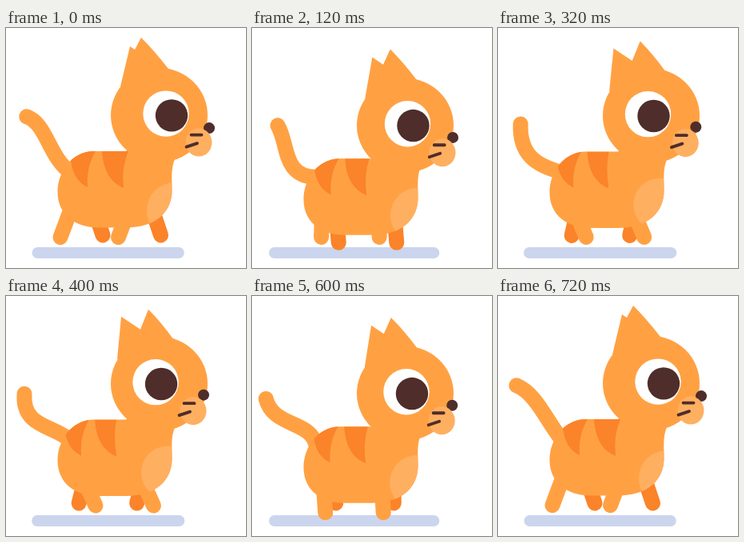
Write an HTML page with a canvas that moves like this. It is 300 px wide and 300 px high and loops after 0.76 s.

```html
<!DOCTYPE html>
<html lang="en">
<head>
<meta charset="utf-8">
<title>Walking cat</title>
<style>
html, body { margin: 0; width: 100%; height: 100%; overflow: hidden; background: #fff; }
canvas { display: block; width: 300px; height: 300px; }
</style>
</head>
<body>
<canvas id="stage" width="300" height="300"></canvas>
<script>
const ctx = document.getElementById('stage').getContext('2d');
const STEP = 40, STEPS = 19, MID = 9;
const FUR = '#ffa143', DARK = '#fb8329', LIGHT = '#ffaf60', BROWN = '#4f2d2a', SHADE = '#cbd5ee';

// Two dips per loop, mirrored about its middle.
const bobAt = s => 10.2 * Math.sin(Math.PI * (Math.abs(s - MID) / 9.2) ** 1.2) ** 2;
// 0 to 1 and back: turns the head and swings the legs.
const turnAt = s => Math.sin(Math.PI * (s / 18) ** 1.1);
// Slow wag of the tail, -1 to 1.
const swayAt = s => Math.cos(2 * Math.PI * (s - 4.5) / STEPS);

const mix = (a, b, k) => a + (b - a) * k;

function fill(color, path) {
  ctx.fillStyle = color;
  ctx.fill(path);
}

function oval(color, x, y, rx, ry = rx) {
  const p = new Path2D();
  p.ellipse(x, y, rx, ry, 0, 0, 2 * Math.PI);
  fill(color, p);
}

function line(color, width, d) {
  ctx.strokeStyle = color;
  ctx.lineWidth = width;
  ctx.stroke(new Path2D(d));
}

// A hind leg and the front leg that moves with it.
function legs(color, hip, bob, x, y) {
  for (const dx of [0, 72.5]) {
    line(color, 19, `M${hip + dx} ${208 + bob}L${x + dx} ${y}`);
  }
}

function drawTail(bob, k, sway) {
  const tip = `${25 + 8 * sway} ${111 + 10 * k + bob - 3 * sway}`;
  const bend = `${50 - 28 * k + 9 * sway} ${120 + 42 * k + 1.5 * bob - 8 * sway}`;
  const root = `${55 - 20 * sway} ${159 + 17 * sway + 6 * k + bob}`;
  line(FUR, 19, `M${tip}C${bend} ${root} 80 ${180 + .7 * bob}`);
}

const torso = new Path2D(`M108 154C82 155 64.5 180 64.5 205C64.5 233 86 249.5 116 249.5L150 249.5
  C187 249.5 207.5 230 207.5 203C207.5 188 206 176 211 164L190 140L160 140L150 154Z`);

function drawTorso(k) {
  fill(FUR, torso);
  ctx.save();
  ctx.clip(torso);
  const a = -8 * k, b = -9 * k, c = -15 * k;
  fill(DARK, new Path2D(`M${112 + a} 154Q${100 + a} 174 ${102 + a} 199
    Q${84 + a} 191 ${81 + a} 165L${81 + a} 150L${112 + a} 150Z`));
  fill(DARK, new Path2D(`M${120 + b} 154Q${122 + b} 190 ${147 + b} 200
    Q${mix(144, 134, k)} 174 ${153 + c} 154Z`));
  oval(LIGHT, 211 - 9 * k, 228 - 8 * k, 35 - 2 * k);
  ctx.restore();
}

function drawHead(k) {
  const at = (x0, y0, x1, y1) => `${mix(x0, x1, k)} ${mix(y0, y1, k)}`;
  oval(FUR, 191.5, 109, 60.5, 59);
  fill(FUR, new Path2D(`M${at(143, 73, 139, 78)}L${at(155, 23, 144, 25)}
    L${at(161, 27, 168, 41)}L${at(169, 12, 178, 16)}
    Q${at(186, 29, 194, 32)} ${at(203, 51, 209, 53)}L226 61L190 110Z`));

  // Face features slide together as the head turns.
  ctx.save();
  ctx.translate(-7 * k, 0);
  oval(BROWN, 254, 125 - 2 * k, 7);
  oval(LIGHT, 241, 143, 16.5, 17.5);
  ctx.translate(-2 * k, 0);
  line(BROWN, 3.8, 'M231.5 133.5L244.5 133.5M225.5 148.5L239 144');
  ctx.translate(-4 * k, 0);
  oval('#fff', 200, 107, 28.7);
  oval(BROWN, 207, 109.3, 20.2);
  ctx.restore();
}

function draw(s) {
  const bob = bobAt(s), k = turnAt(s), half = 88 + 1.25 * bob;
  ctx.clearRect(0, 0, 300, 300);
  ctx.lineCap = 'round';
  line(SHADE, 14, `M${127.7 - half} 281L${127.7 + half} 281`);

  // The legs that carry the weight sink with the body.
  legs(DARK, 104, bob, 121 - 30 * k, 259 + (s < MID ? bob : 0));
  drawTail(bob, k, swayAt(s));
  legs(FUR, 88, bob, 68 + 44 * k, 261.5 + (s > MID ? bob : 0));

  ctx.save();
  ctx.translate(0, bob);
  drawTorso(k);
  ctx.translate(0, bob * .38);
  drawHead(k);
  ctx.restore();
}

function tick() {
  draw(Math.floor(performance.now() / STEP) % STEPS);
  requestAnimationFrame(tick);
}
tick();
</script>
</body>
</html>
```
